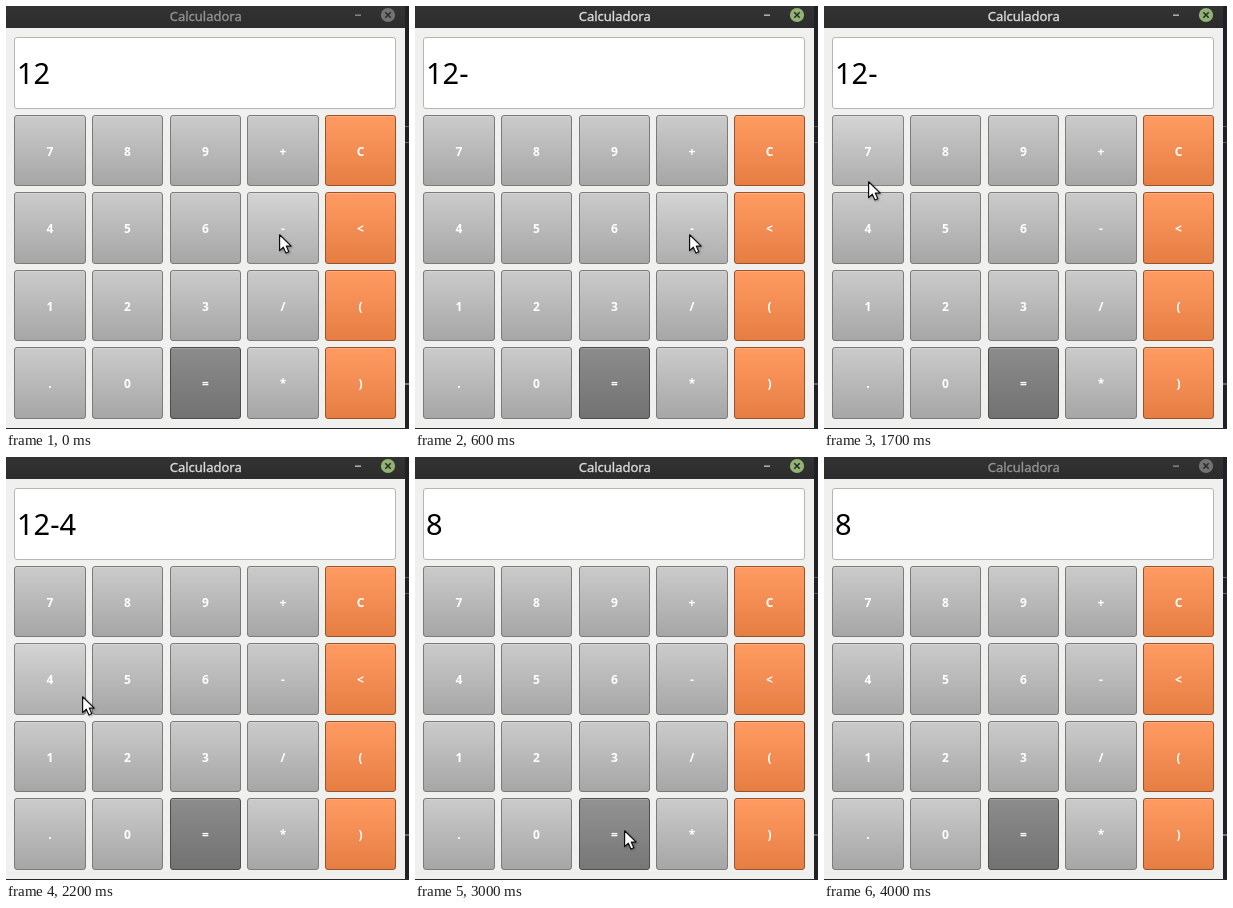
Recreate the animation shown at these times as an HTML page. Size 403 px wide and 423 px high, loop 4200 ms.

```html
<!DOCTYPE html>
<html lang="es">
<head>
<meta charset="utf-8">
<title>Calculadora</title>
<style>
  html, body { margin: 0; width: 100%; height: 100%; overflow: hidden; background: #1e1e22; }
  svg { display: block; }
  text { font-family: "Noto Sans", "Open Sans", sans-serif; }
  .title { font-size: 13px; text-anchor: middle; stroke-width: .35; }
  .label { font-size: 12px; font-weight: 700; text-anchor: middle; fill: #fff; }
  .display { font-size: 29px; fill: #000; }
  .hover { filter: brightness(1.045); }
</style>
</head>
<body>
<svg width="403" height="423" viewBox="0 0 403 423">
  <defs id="defs">
    <linearGradient id="bar" x2="0" y2="1">
      <stop stop-color="#333"/><stop offset="1" stop-color="#2c2c2c"/>
    </linearGradient>
    <filter id="shadow" x="-30%" y="-30%" width="180%" height="180%">
      <feDropShadow dx="1" dy="1" stdDeviation=".8" flood-opacity=".3"/>
    </filter>
  </defs>
  <rect x="399" width="4" height="423" fill="#202026"/>
  <g id="ticks">
    <path d="M399 120.5h4m-4 16h4" stroke="#66666c"/>
    <path d="M399 378h4" stroke="#ccc"/>
  </g>
  <rect width="399" height="422" fill="#f0f0ef"/>
  <rect width="399" height="22" fill="url(#bar)"/>
  <rect y="422" width="403" height="1" fill="#29292c"/>
  <text class="title" id="title" x="199.7" y="15">Calculadora</text>
  <path id="minimize" d="M349 9.2h6" stroke-width="1.5"/>
  <circle id="close" cx="382" cy="9" r="7.1"/>
  <path d="M379.3 6.3l5.4 5.4m0-5.4l-5.4 5.4" stroke="#2b2b2b" stroke-width="1.6"/>
  <rect x="8.5" y="31.5" width="381" height="71" rx="2.5" fill="#fff" stroke="#b5b5b3"/>
  <text class="display" id="display" x="11" y="78"></text>
  <g id="keys"></g>
  <path id="cursor" d="M.6 .8V16.6L4.3 13.2L6.9 19L9.8 17.7L7.3 12.1H12.2Z"
    fill="#fff" stroke="#111" stroke-width="1.2" stroke-linejoin="round" filter="url(#shadow)"/>
</svg>
<script>
const LOOP = 4200, STEP = 100;
const $ = id => document.getElementById(id);

function svg(tag, attrs, parent) {
  const node = document.createElementNS("http://www.w3.org/2000/svg", tag);
  for (const name in attrs) node.setAttribute(name, attrs[name]);
  return parent.appendChild(node);
}

const palettes = {
  gray: { top: "#cbcbcb", bottom: "#a6a6a6", border: "#7b7b7b", pressed: "#999" },
  orange: { top: "#ff9b62", bottom: "#e67e43", border: "#9a5229", pressed: "#d8733a" },
  dark: { top: "#8c8c8c", bottom: "#727272", border: "#4c4c4c", pressed: "#666" }
};
for (const id in palettes) {
  const gradient = svg("linearGradient", { id, x2: 0, y2: 1 }, $("defs"));
  svg("stop", { "stop-color": palettes[id].top }, gradient);
  svg("stop", { offset: 1, "stop-color": palettes[id].bottom }, gradient);
}

// Pixel-snapped edges of one grid cell
const cell = (origin, pitch, index) => {
  const start = origin + pitch * index;
  return [Math.round(start), Math.round(start + 71.4)];
};

const keys = [];
["789+C", "456-<", "123/(", ".0=*)"].forEach((line, row) => [...line].forEach((label, column) => {
  const [left, right] = cell(8.1, 77.7, column);
  const [top, bottom] = cell(109, 77.4, row);
  const kind = column === 4 ? "orange" : label === "=" ? "dark" : "gray";
  const face = svg("rect", {
    x: left + .5, y: top + .5, width: right - left - 1, height: bottom - top - 1,
    rx: 2.5, stroke: palettes[kind].border
  }, $("keys"));
  svg("path", { d: `M${left + 2} ${top + 1.5}H${right - 2}`, stroke: "#fff", "stroke-opacity": .18 }, $("keys"));
  svg("text", { class: "label", x: (left + right) / 2, y: top + 41 }, $("keys")).textContent = label;
  keys.push({ label, kind, face, left, right, top, bottom });
}));

// Pointer glides: start, end, destination
const glides = [
  [800, 1100, 136, 211], [1100, 1400, 23, 150],
  [1600, 1700, 44, 175], [1700, 2000, 76, 239],
  [2200, 2400, 254, 317],
  [2600, 2700, 222, 370], [2700, 2800, 209, 373],
  [3300, 3400, 138, 218], [3400, 3600, 50, 1], [3600, 3700, 6, -108]
];

// Display changes, with the key seen held down just before
const entries = [
  { time: 0, text: "12" },
  { time: 600, text: "12-", key: "-" },
  { time: 2200, text: "12-4" },
  { time: 3000, text: "8", key: "=" }
];

function pointerAt(time) {
  let x = time < 300 ? 273 : 274, y = 228;
  for (const [start, end, toX, toY] of glides) {
    const progress = Math.min(1, Math.max(0, (time - start) / (end - start)));
    x += (toX - x) * progress;
    y += (toY - y) * progress;
  }
  return [Math.round(x), Math.round(y)];
}

function render(now) {
  const time = Math.floor(now % LOOP / STEP) * STEP;
  const [x, y] = pointerAt(time);
  const pressed = entries.find(entry => entry.time === time + STEP)?.key;
  const active = time >= 500 && time < 4000;

  $("display").textContent = entries.findLast(entry => entry.time <= time).text;
  $("cursor").setAttribute("transform", `translate(${x} ${y})`);
  const titleColor = active ? "#dadada" : "#929292";
  $("title").setAttribute("fill", titleColor);
  $("title").setAttribute("stroke", titleColor);
  $("minimize").setAttribute("stroke", active ? "#b4b4b4" : "#858585");
  $("close").setAttribute("fill", active ? "#92b372" : "#737373");
  $("ticks").setAttribute("opacity", active ? .8 : 1);

  for (const { label, kind, face, left, right, top, bottom } of keys) {
    const hover = x >= left && x < right && y >= top && y < bottom;
    const held = label === pressed;
    face.setAttribute("fill", held ? palettes[kind].pressed : `url(#${kind})`);
    face.setAttribute("class", hover && !held ? "hover" : "");
  }
}

function tick() {
  render(performance.now());
  requestAnimationFrame(tick);
}
tick();
</script>
</body>
</html>
```
